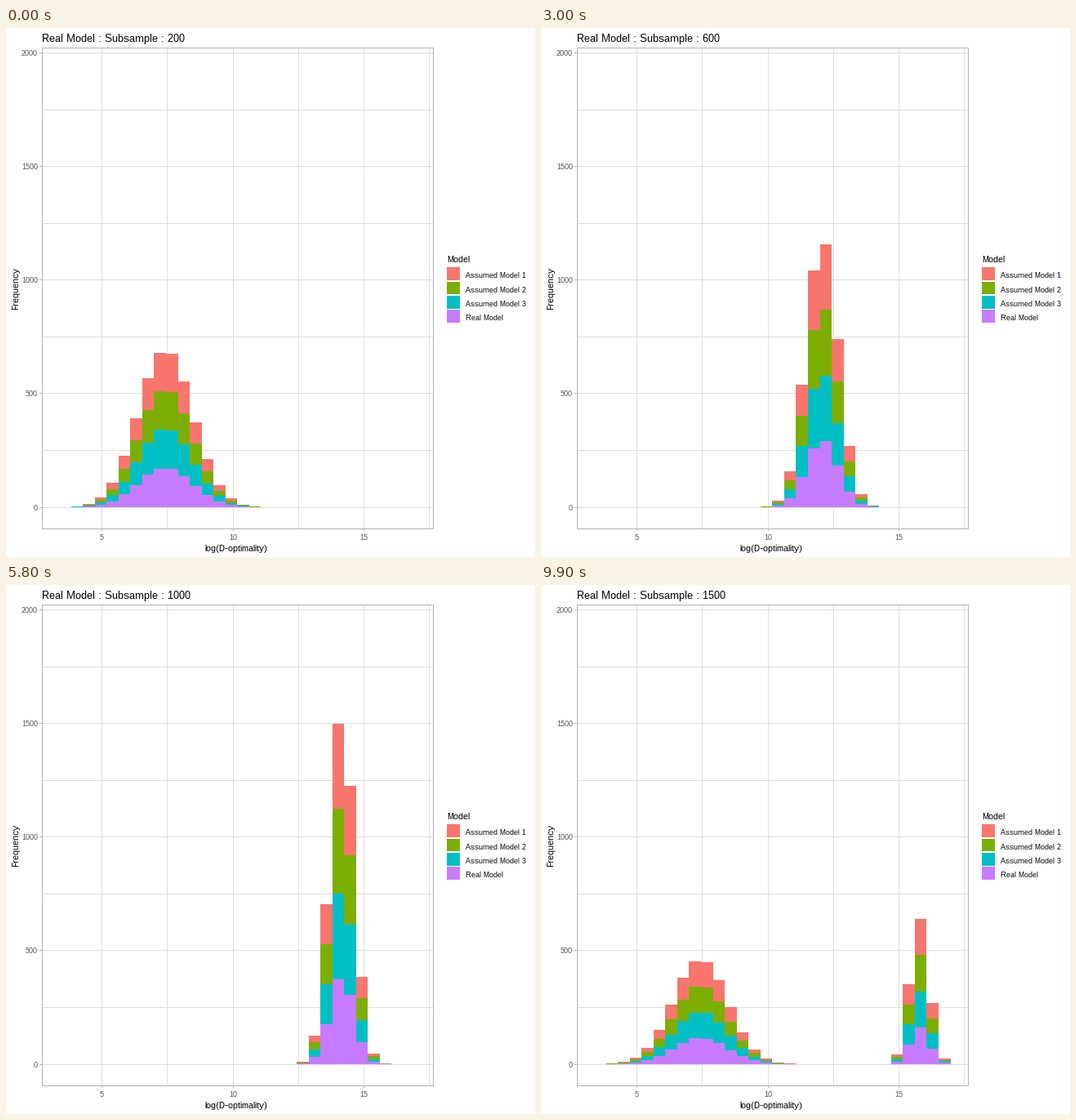
A matplotlib script for the animation above (10000 ms loop, 648 by 648 pixels).

```python
import math

import matplotlib.pyplot as plt
import numpy as np
from matplotlib.animation import FuncAnimation
from matplotlib.patches import Rectangle

plt.rcParams.update({
    "font.family": "Liberation Sans",
    "text.hinting": "native",
    "text.hinting_factor": 1,
})

SIZE, BINS, DRAWS = 648, 30, 4000
FRAMES, INTERVAL = 100, 100
SIZES = list(range(200, 1501, 100))
# Frame on which each sample size is fully reached, then the wrap-around.
REACHED = [0, 7, 15, 23] + list(range(30, 94, 7)) + [100]

COLORS = ["#C77CFF", "#00BFC4", "#7CAE00", "#F8766D"]
NAMES = ["Real Model", "Assumed Model 3", "Assumed Model 2", "Assumed Model 1"]

# Centre and spread of the histogram, in bins, at a few sample sizes.
KEY_LOGS = np.log([200, 300, 600, 800, 1000, 1200, 1500])
KEY_MEANS = [8.45, 12.32, 18.69, 21.30, 23.29, 24.92, 26.91]
KEY_SDS = [2.28, 1.88, 1.31, 1.12, 0.98, 0.89, 0.77]


def stacks(n):
    """Cumulative tops: one row per bin, one column per model."""
    mean = np.interp(math.log(n), KEY_LOGS, KEY_MEANS)
    sd = np.interp(math.log(n), KEY_LOGS, KEY_SDS)
    cdf = [0.5 * math.erf((i - 0.5 - mean) / (sd * math.sqrt(2)))
           for i in range(BINS + 1)]
    total = np.round(DRAWS * np.diff(cdf))
    return np.outer(total, [0.25, 0.5, 0.75, 1])


STACKS = [stacks(n) for n in SIZES]


def px(value):
    return round(117 + 32.1 * (value - 5))


def py(value):
    return int(587 - 0.27825 * value)


fig = plt.figure(figsize=(SIZE / 72, SIZE / 72), dpi=72, facecolor="white")
ax = fig.add_axes([0, 0, 1, 1])
ax.set_xlim(0, SIZE)
ax.set_ylim(SIZE, 0)
ax.axis("off")


def box(x0, y0, x1, y1, color, z=1):
    patch = Rectangle((x0, y0), x1 - x0, y1 - y0, facecolor=color,
                      linewidth=0, antialiased=False, zorder=z)
    ax.add_patch(patch)
    return patch


def label(x, y, text, size, color="black", **kw):
    return ax.text(x, y, text, fontsize=size, color=color, va="baseline", **kw)


GRID, BORDER, TICK = "#DEDEDE", "#B3B3B3", "#4D4D4D"
LEFT, TOP, RIGHT, BOTTOM = 44, 24, 523, 613

for v in np.arange(5, 18, 2.5):
    box(px(v), TOP, px(v) + 1, BOTTOM, GRID)
for v in range(0, 2001, 250):
    box(LEFT, py(v), RIGHT, py(v) + 1, GRID)

for v in (5, 10, 15):
    box(px(v), BOTTOM, px(v) + 1, BOTTOM + 3, BORDER)
    label(px(v), 627, str(v), 9, TICK, ha="center")
for v in range(0, 2001, 500):
    box(LEFT - 3, py(v), LEFT, py(v) + 1, BORDER)
    label(39, py(v) + 4, str(v), 9, TICK, ha="right")

for x in (LEFT, RIGHT):
    box(x, TOP, x + 1, BOTTOM + 1, BORDER, 4)
for y in (TOP, BOTTOM):
    box(LEFT, y, RIGHT + 1, y + 1, BORDER, 4)

title = label(44, 17, "", 13)
label(282, 641, "log(D-optimality)", 11, ha="center")
label(15, 319, "Frequency", 11, ha="center", rotation=90,
      rotation_mode="anchor")

label(540, 287, "Model", 11)
for k, (color, name) in enumerate(zip(COLORS[::-1], NAMES[::-1])):
    y = 293.3 + 17.28 * k
    box(540, round(y), 556, round(y + 15.86), color)
    label(563, round(y) + 13, name, 9)

edges = [int(65.55 + 14.55 * i) for i in range(BINS + 1)]
bars = [[box(a, 587, b, 587, c, 3) for c in COLORS]
        for a, b in zip(edges, edges[1:])]


def draw(frame):
    i = max(k for k in range(len(SIZES)) if REACHED[k] <= frame)
    steps = 4 if i < 3 else 3
    t = max(0, 1 - (REACHED[i + 1] - frame) / steps)
    tops = (1 - t) * STACKS[i] + t * STACKS[(i + 1) % len(SIZES)]
    rows = np.round(587 - 0.27825 * tops)
    for stack, ys in zip(bars, rows):
        base = 587
        for bar, y in zip(stack, ys):
            bar.set_y(y)
            bar.set_height(base - y)
            bar.set_visible(bool(base > y))
            base = y
    title.set_text(f"Real Model : Subsample : {SIZES[i]}")
    return []


anim = FuncAnimation(fig, draw, frames=FRAMES, interval=INTERVAL,
                     init_func=lambda: draw(0), repeat=True, repeat_delay=0)
plt.show()
```
